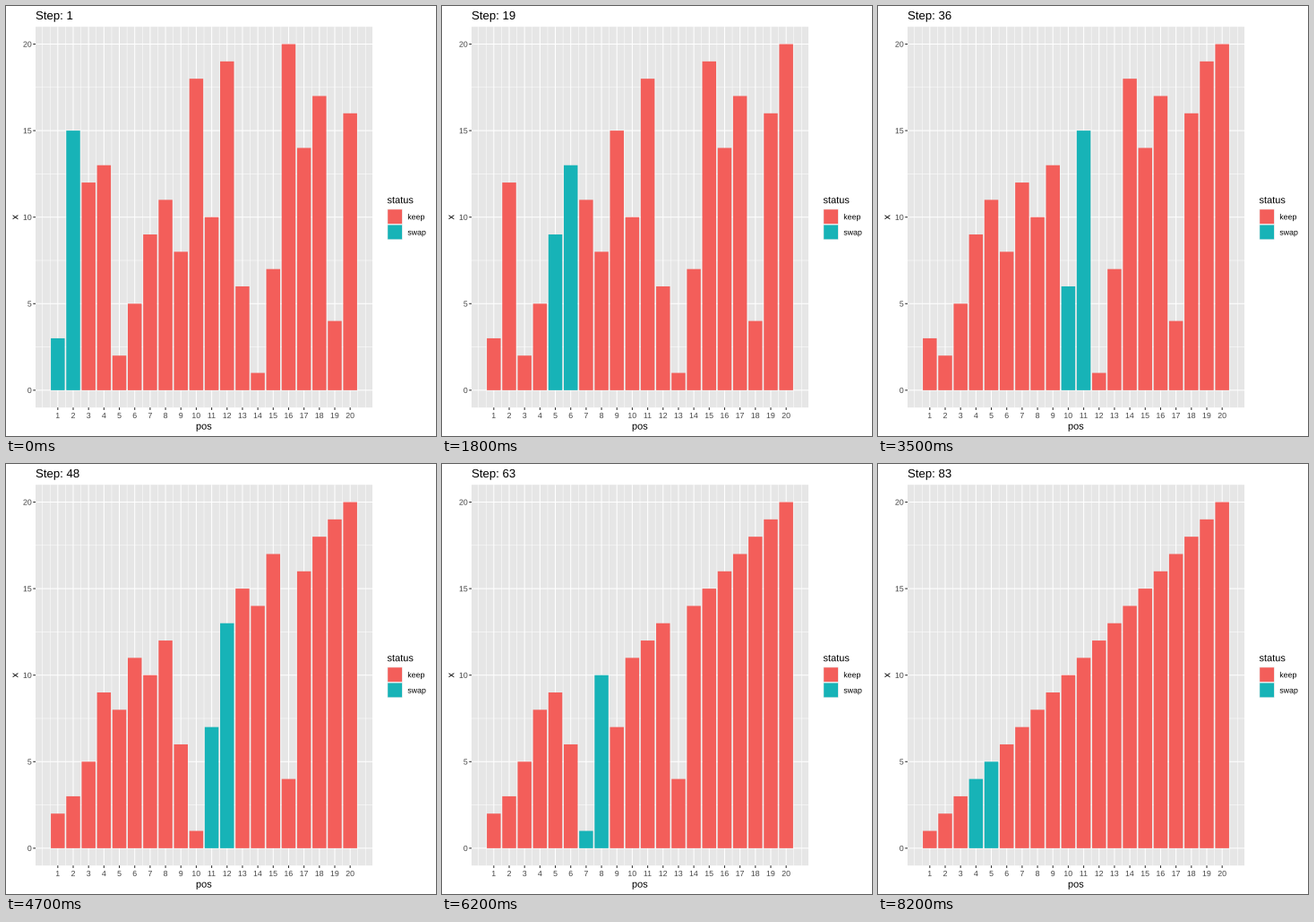
Write a matplotlib script that moves like this. It is 480 px wide and 480 px high and loops after 9300 ms.

```python
import matplotlib.pyplot as plt
from matplotlib.animation import FuncAnimation
from matplotlib.patches import PathPatch, Rectangle
from matplotlib.textpath import TextPath
from matplotlib.transforms import Affine2D

SIZE = 480
STEP_MS, LOOP_MS = 100, 9300
LEFT, RIGHT, TOP, BOTTOM = 33.0, 409.0, 23.2, 448.2
KEEP, SWAP = "#F35E5A", "#17B3B7"
PANEL, KEY = "#E6E6E6", "#EFEFEF"
LABEL, TICK = "#444444", "#333333"
START = [15, 3, 12, 13, 2, 5, 9, 11, 8, 18, 10, 19, 6, 1, 7, 20, 14, 17, 4, 16]
N = len(START)


def bubble_steps(values):
    """Every swap of a bubble sort as (values, left index of the pair)."""
    values, steps = list(values), []
    for end in range(len(values) - 1, 0, -1):
        for i in range(end):
            if values[i] > values[i + 1]:
                values[i], values[i + 1] = values[i + 1], values[i]
                steps.append((list(values), i))
    return steps


def px(pos):
    return LEFT + (pos + 0.445) / 21.89 * (RIGHT - LEFT)


def py(value):
    return BOTTOM - (value + 1) / 22 * (BOTTOM - TOP)


fig = plt.figure(figsize=(4.8, 4.8), dpi=100, facecolor="white")
ax = fig.add_axes([0, 0, 1, 1])
ax.set_xlim(0, SIZE)
ax.set_ylim(SIZE, 0)
ax.axis("off")


def box(x0, y0, x1, y1, color):
    patch = Rectangle((x0, y0), x1 - x0, y1 - y0, facecolor=color, linewidth=0)
    patch.set_snap(False)
    return ax.add_patch(patch)


def vline(x, y0, y1, width, color="white"):
    box(x - width / 2, y0, x + width / 2, y1, color)


def hline(y, x0, x1, width, color="white"):
    box(x0, y - width / 2, x1, y + width / 2, color)


def text_path(s, x, y, size, align=0.0, angle=0):
    """Outline of s with its baseline at y; align 0 left, 0.5 centre, 1 right."""
    path = TextPath((0, 0), s, size=size, prop={"family": "Liberation Sans"})
    box_ = path.get_extents()
    shift = -align * (box_.x0 + box_.x1) if align == 0.5 else -align * box_.x1
    move = Affine2D().translate(shift, 0).scale(1, -1)
    return move.rotate_deg(angle).translate(x, y).transform_path(path)


def label(s, x, y, size, color="black", **kw):
    patch = PathPatch(text_path(s, x, y, size, **kw), facecolor=color, linewidth=0)
    return ax.add_patch(patch)


# Panel and grid
box(LEFT, TOP, RIGHT, BOTTOM, PANEL)
for v in (2.5, 7.5, 12.5, 17.5):
    hline(py(v), LEFT, RIGHT, 0.53)
for p in [0] + [k + 0.5 for k in range(N + 1)] + [N + 1]:
    vline(px(p), TOP, BOTTOM, 0.53)
for v in range(0, 21, 5):
    hline(py(v), LEFT, RIGHT, 1.07)
for p in range(1, N + 1):
    vline(px(p), TOP, BOTTOM, 1.07)

bars = [box(px(p - 0.45), py(0), px(p + 0.45), py(v), KEEP)
        for p, v in enumerate(START, 1)]

# Axes
for v in range(0, 21, 5):
    hline(py(v), LEFT - 2.75, LEFT, 1.07, TICK)
    label(str(v), LEFT - 4.6, py(v) + 3.15, 8.8, LABEL, align=1)
for p in range(1, N + 1):
    vline(px(p), BOTTOM, BOTTOM + 2.75, 1.07, TICK)
    label(str(p), px(p), 460.1, 8.8, LABEL, align=0.5)
label("pos", (LEFT + RIGHT) / 2, 472.6, 11, align=0.5)
label("x", 13.4, (TOP + BOTTOM) / 2, 11, align=0.5, angle=-90)

# Legend
label("status", 425.5, 220.2, 11)
for k, (name, color) in enumerate((("keep", KEEP), ("swap", SWAP))):
    y = 226.5 + 17.28 * k
    box(425.5, y, 442.78, y + 17.28, KEY)
    box(426.21, y + 0.71, 442.07, y + 16.57, color)
    label(name, 448.3, y + 11.8, 8.8)

title = label("Step: 1", LEFT, 15, 13.2)
steps = bubble_steps(START)


def draw(frame):
    k = min(frame, len(steps) - 1)
    values, pair = steps[k]
    for i, (bar, v) in enumerate(zip(bars, values)):
        bar.set_height(py(v) - py(0))
        bar.set_facecolor(SWAP if i in (pair, pair + 1) else KEEP)
    title.set_path(text_path(f"Step: {k + 1}", LEFT, 15, 13.2))
    return bars + [title]


anim = FuncAnimation(fig, draw, frames=LOOP_MS // STEP_MS, interval=STEP_MS,
                     repeat=True, repeat_delay=0, blit=False)
plt.show()
```
